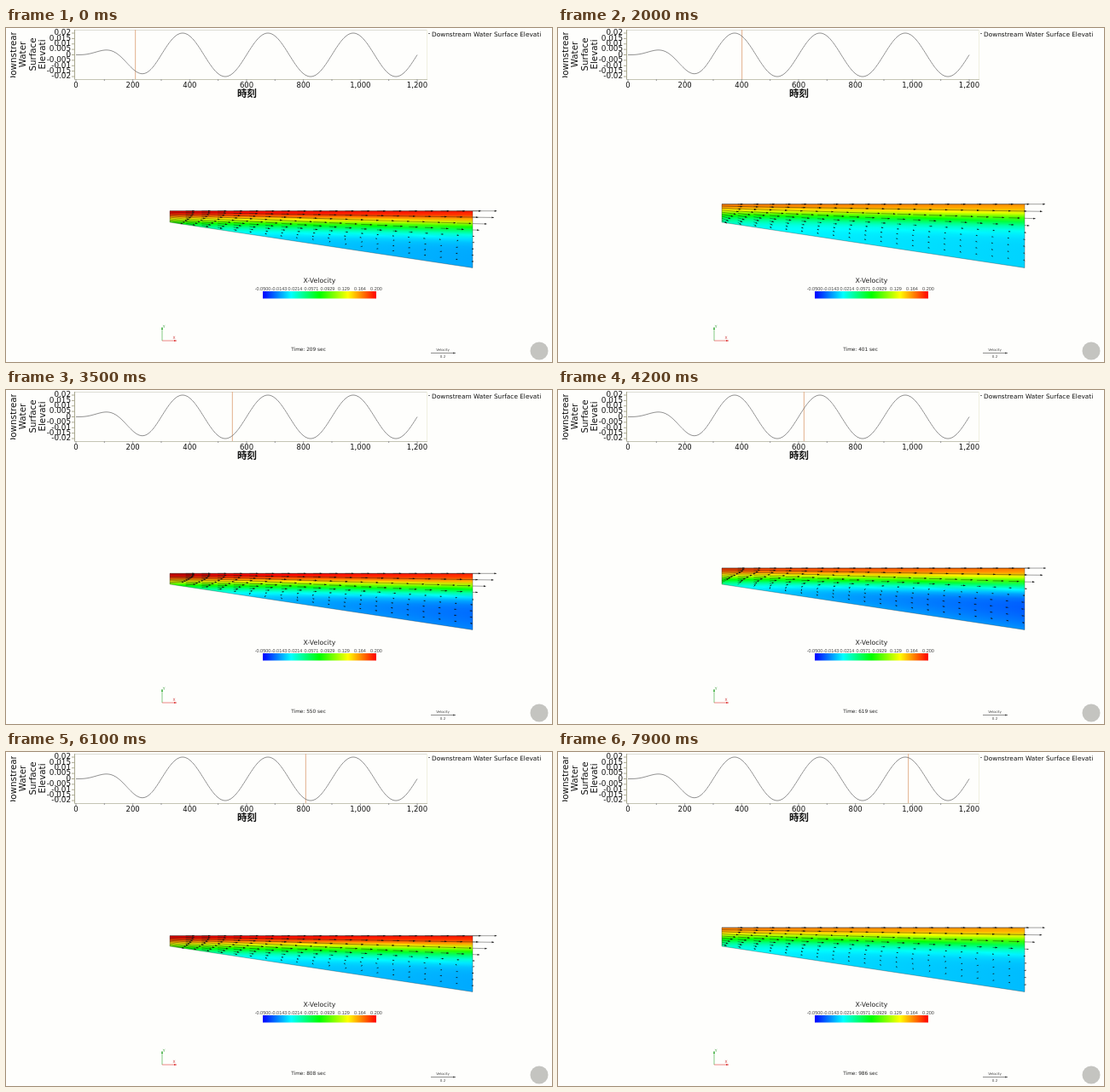
Animation of 640 by 392 pixels, one loop 8 s. Source, as an HTML page with a canvas:

```html
<!DOCTYPE html>
<html lang="ja">
<head>
<meta charset="utf-8">
<style>
html, body { margin: 0; width: 100%; height: 100%; overflow: hidden; background: #fefefc; }
canvas { display: block; }
</style>
</head>
<body>
<canvas id="stage" width="640" height="392"></canvas>
<script>
const ctx = document.getElementById('stage').getContext('2d');
const SANS = '"Liberation Sans", Arial, sans-serif';
const WIDE = '"DejaVu Sans", Verdana, sans-serif';
const LEFT = 192, RIGHT = 547, BED_LEFT = 228, BED_RIGHT = 281.5;
const COLS = 19, ROWS = 9, VECTOR_SCALE = 145;
// [loop time in ms, simulated seconds]
const CLOCK = [[0, 209], [1200, 322], [2800, 480], [4200, 619], [5200, 718], [7000, 897], [7900, 986]];

const mix = (a, b, k) => a + (b - a) * k;
const clamp = (v, lo, hi) => Math.min(hi, Math.max(lo, v));
const angle = sec => sec * Math.PI / 150;
const rainbow = hue => `hsl(${hue}, 100%, 50%)`;

function secondsAt(ms) {
  const i = Math.max(1, CLOCK.findIndex(k => k[0] >= ms));
  const [t0, s0] = CLOCK[i - 1], [t1, s1] = CLOCK[i];
  return Math.round(mix(s0, s1, (ms - t0) / (t1 - t0)));
}

function elevation(sec) {
  const ramp = (1 - Math.cos(Math.PI * Math.min(sec, 300) / 300)) / 2;
  return 0.02 * ramp * Math.sin(angle(sec));
}

const chartX = sec => 82 + sec / 3;
const chartY = e => 31.5 - e * 1275;
const bedY = k => mix(BED_LEFT, BED_RIGHT, k);

function text(str, x, y, size, { align = 'center', weight = 'normal', family = WIDE, color = '#111' } = {}) {
  ctx.font = `${weight} ${size}px ${family}`;
  ctx.textAlign = align;
  ctx.textBaseline = 'middle';
  ctx.fillStyle = color;
  ctx.fillText(str, x, y);
}

function line(x0, y0, x1, y1, color, width = 1) {
  ctx.strokeStyle = color;
  ctx.lineWidth = width;
  ctx.beginPath();
  ctx.moveTo(x0, y0);
  ctx.lineTo(x1, y1);
  ctx.stroke();
}

function arrow(x, y, dx, dy, color = '#000', head = 3, width = 0.6) {
  line(x, y, x + dx, y + dy, color, width);
  ctx.save();
  ctx.translate(x + dx, y + dy);
  ctx.rotate(Math.atan2(dy, dx));
  ctx.fillStyle = color;
  ctx.beginPath();
  ctx.moveTo(0, 0);
  ctx.lineTo(-head, -head * 0.35);
  ctx.lineTo(-head, head * 0.35);
  ctx.fill();
  ctx.restore();
}

function drawChart(sec) {
  ctx.save();
  ctx.beginPath();
  ctx.rect(5, 5, 44, 53);
  ctx.clip();
  ['Downstream', 'Water', 'Surface', 'Elevati'].forEach((word, i) => {
    ctx.save();
    ctx.translate([9, 20, 32, 43][i], 31);
    ctx.rotate(-Math.PI / 2);
    text(word, 0, 0, 10.3);
    ctx.restore();
  });
  ctx.restore();

  line(80, 2.5, 493, 2.5, '#dcdcd4');
  line(493.5, 2, 493.5, 60, '#f0f0e0');
  line(80.5, 2, 80.5, 60, '#aaa890');
  line(80, 60.5, 494, 60.5, '#c4c4b4');
  for (let i = 0; i < 9; i++) {
    const value = 0.02 - i * 0.005, y = chartY(value);
    line(77, y, 80, y, '#aaa890');
    text(String(+value.toFixed(3)), 76, y, 8.8, { align: 'right' });
  }
  for (let s = 0; s <= 1200; s += 100) {
    const major = s % 200 === 0;
    line(chartX(s), 60, chartX(s), major ? 63 : 62, '#999');
    if (major) text(s.toLocaleString('en-US'), chartX(s), 68, 8.5);
  }
  text('時刻', 282.5, 77, 11.5, { weight: 'bold', family: '"Noto Sans CJK JP", "Noto Sans CJK", sans-serif' });

  line(chartX(sec), 2, chartX(sec), 60, '#e2b08c');
  ctx.strokeStyle = '#777';
  ctx.lineWidth = 0.8;
  ctx.beginPath();
  for (let s = 0; s <= 1200; s += 3) ctx.lineTo(chartX(s), chartY(elevation(s)));
  ctx.stroke();

  line(495, 6.5, 497, 6.5, '#777');
  text('Downstream Water Surface Elevati', 499, 7.7, 7.35, { align: 'left' });
}

// Hue of the velocity colour scale: k runs along the basin, d is depth in pixels.
function flowHue(k, d, depth, sec) {
  const a = angle(sec), s = Math.sin(a), c = Math.cos(a);
  const top = 12 + 16 * s - 5 * c + k * (8 + 6 * c);
  const deep = mix(170, 204 + 21 * Math.cos(a + 0.17), Math.pow(k, 0.35));
  const spread = 1 - Math.exp(-Math.pow(d / mix(13.5, 20.5, k), 2.1));
  const nearBed = Math.pow(d / depth, 4) * 18 * Math.max(c, 0) * k;
  return clamp(mix(top, deep, spread) - nearBed, 0, 240);
}

function drawBasin(sec) {
  const top = 211 - 250 * elevation(sec);
  const outline = new Path2D(
    `M${LEFT} ${top}H${RIGHT}V${BED_RIGHT}L${LEFT} ${BED_LEFT}Z`);
  ctx.save();
  ctx.clip(outline);
  for (let x = LEFT; x < RIGHT; x += 2) {
    const k = (x - LEFT) / (RIGHT - LEFT), depth = bedY(k) - top;
    const shade = ctx.createLinearGradient(0, top, 0, top + depth);
    for (let i = 0; i <= 14; i++) {
      shade.addColorStop(i / 14, rainbow(flowHue(k, depth * i / 14, depth, sec)));
    }
    ctx.fillStyle = shade;
    ctx.fillRect(x, top - 1, 2, depth + 3);
  }
  ctx.restore();
  ctx.strokeStyle = 'rgba(0, 0, 0, .45)';
  ctx.lineWidth = 0.6;
  ctx.stroke(outline);

  const rise = Math.cos(angle(sec));
  for (let c = 0; c <= COLS; c++) {
    const k = c / COLS, depth = bedY(k) - top;
    for (let r = 0; r < ROWS; r++) {
      const f = r / ROWS, d = depth * f;
      const u = 0.2 - 0.25 * flowHue(k, d, depth, sec) / 240;
      const dx = u * VECTOR_SCALE;
      const dy = f * (dx * 0.1 - rise * (0.5 + 6 * Math.exp(-k * 6)));
      arrow(mix(LEFT, RIGHT, k), top + d, dx, dy, '#111', Math.abs(dx) > 5 ? 2.6 : 2, 0.4);
    }
  }
}

function drawKeys(sec) {
  text('X-Velocity', 367.5, 297, 7.8, { color: '#222' });
  '-0.0500 -0.0143 0.0214 0.0571 0.0929 0.129 0.164 0.200'.split(' ')
    .forEach((label, i) => text(label, 301 + i * 19, 306.5, 5.5, { family: SANS, color: '#444' }));
  const bar = ctx.createLinearGradient(301, 0, 434, 0);
  for (let i = 0; i <= 12; i++) bar.addColorStop(i / 12, rainbow(240 - i * 20));
  ctx.fillStyle = bar;
  ctx.fillRect(301, 309, 133, 8.5);

  arrow(183, 367, 0, -16, '#3a3', 3);
  arrow(183, 367, 17, 0, '#d33', 3);
  text('Y', 185, 351, 4.5, { color: '#393' });
  text('X', 197, 364, 4.5, { color: '#c33' });
  text(`Time: ${sec} sec`, 354.5, 377.5, 5.8, { color: '#222' });
  text('Velocity', 512, 378, 4, { color: '#444' });
  arrow(498, 381.5, 29, 0, '#444');
  text('0.2', 512, 386, 4, { color: '#444' });

  ctx.fillStyle = '#c4c4c0';
  ctx.beginPath();
  ctx.arc(625, 379, 10.5, 0, Math.PI * 2);
  ctx.fill();
}

const start = performance.now();
function draw() {
  const ms = Math.floor((performance.now() - start) % 8000 / 100) * 100;
  const sec = secondsAt(ms);
  ctx.fillStyle = '#fefefc';
  ctx.fillRect(0, 0, 640, 392);
  drawChart(sec);
  drawBasin(sec);
  drawKeys(sec);
  requestAnimationFrame(draw);
}
draw();
</script>
</body>
</html>
```
